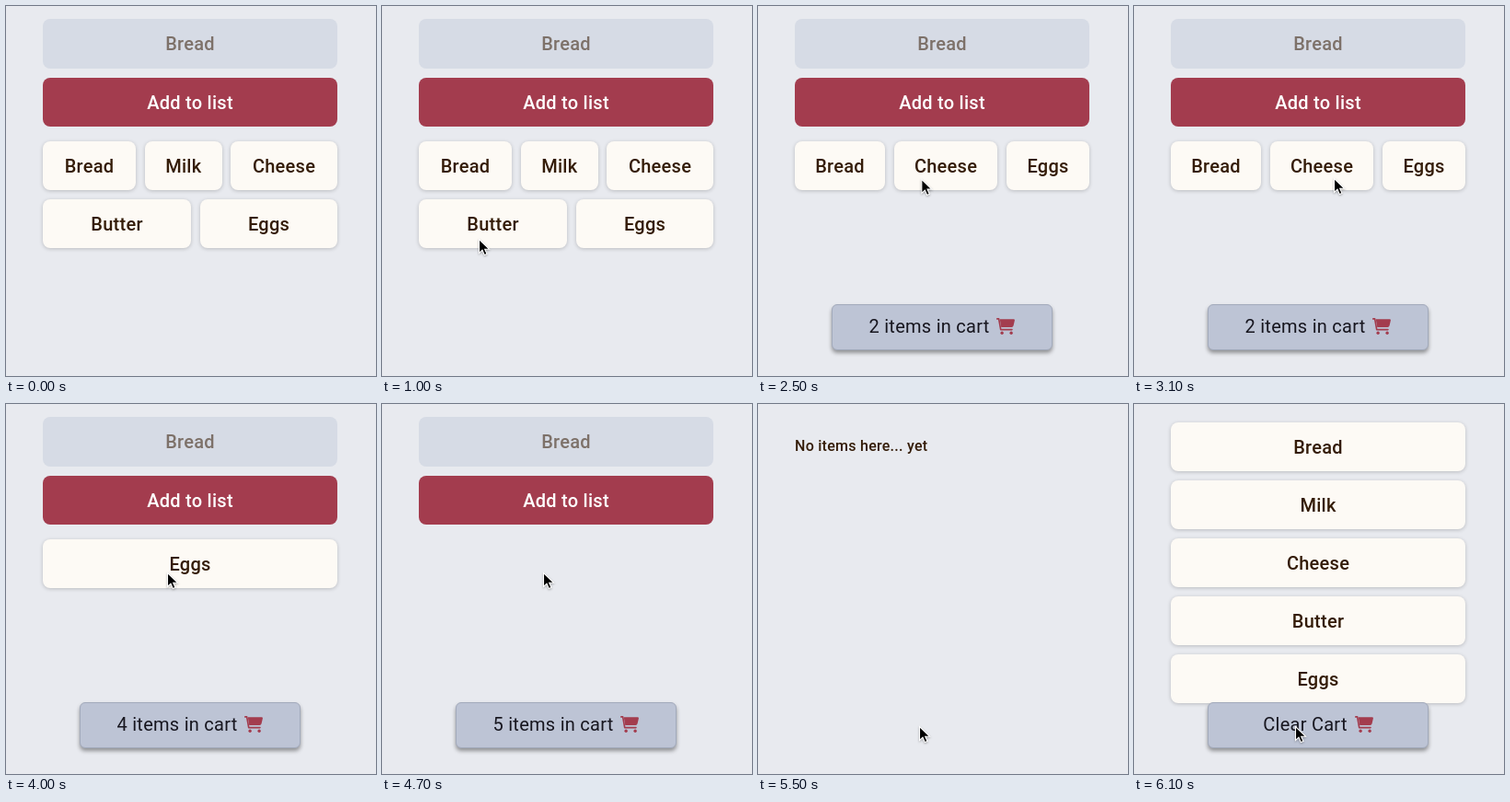
Animation of 402x402 px, one loop 8000 ms. Source, as an HTML page:

```html
<!DOCTYPE html>
<html lang="en">
<head>
<meta charset="utf-8">
<title>Shopping list</title>
<style>
  html, body { margin: 0; width: 100%; height: 100%; overflow: hidden; background: #e8eaef; }
  #stage { position: relative; width: 402px; height: 402px; overflow: hidden;
    font: 500 20px Roboto, Rubik, sans-serif; letter-spacing: .013em; color: #341c08; }
  .box { position: absolute; left: 40px; width: 320px; height: 53px; box-sizing: border-box;
    display: flex; align-items: center; justify-content: center; border-radius: 8px; white-space: nowrap; }
  .input { top: 14px; height: 54px; background: #d6dbe5; color: #7d7169; }
  .add { top: 78px; background: #a33c4e; color: #fff; }
  .card { background: #fdfaf5; box-shadow: 0 1px 4px rgba(0, 0, 0, .2); }
  .cart { left: 80px; top: 324px; width: 240px; height: 50px; gap: 8px; padding-bottom: 2px;
    background: #bdc4d5; border: 1px solid #a2aabb; border-radius: 6px; color: #17161f;
    font-weight: 400; box-shadow: 0 3px 4px rgba(0, 0, 0, .38); }
  .cart svg { width: 20px; height: 18px; }
  .empty { position: absolute; left: 40px; top: 36px; font-size: 16px; line-height: 19px; }
  #cursor { position: absolute; left: 0; top: 0; width: 16px; height: 22px; overflow: visible;
    filter: drop-shadow(0 1px 1px rgba(0, 0, 0, .3)); }
</style>
</head>
<body>
<div id="stage">
  <div id="view"></div>
  <svg id="cursor" viewBox="0 0 16 22">
    <path d="M.5 .5V15.5L4 12.2L6.3 17.6L9 16.4L6.7 11.2H11.5Z" fill="#000" stroke="#fff" stroke-width="1.1"/>
  </svg>
</div>
<script>
const LOOP = 8000, STEP = 100;
const view = document.getElementById('view');
const cursor = document.getElementById('cursor');

const cartIcon = `<svg viewBox="0 0 576 512" fill="#a33c4e">
  <path d="M108 36H540Q582 36 572 76L535 236Q524 288 476 288H152Z"/>
  <path d="M24 24H76L136 360H488" fill="none" stroke="#a33c4e" stroke-width="48" stroke-linecap="round" stroke-linejoin="round"/>
  <circle cx="176" cy="464" r="48"/><circle cx="464" cy="464" r="48"/></svg>`;

const card = (name, left = 40, right = 360, top = 147) =>
  `<div class="box card" style="left:${left}px;width:${right - left}px;top:${top}px">${name}</div>`;
const cart = label => `<div class="box cart"><span>${label}</span>${cartIcon}</div>`;
const count = n => cart(`${n} item${n > 1 ? 's' : ''} in cart`);
const form = '<div class="box input">Bread</div><div class="box add">Add to list</div>';
const firstRow = card('Bread', 40, 141) + card('Milk', 151, 234.5) + card('Cheese', 244, 360);
const allItems = ['Bread', 'Milk', 'Cheese', 'Butter', 'Eggs'];

// [start time, markup]
const screens = [
  [0, form + firstRow + card('Butter', 40, 201, 210) + card('Eggs', 211, 360, 210)],
  [1300, form + firstRow + card('Eggs', 40, 360, 210) + count(1)],
  [2300, form + card('Bread', 40, 138) + card('Cheese', 148, 260) + card('Eggs', 270, 360) + count(2)],
  [3300, form + card('Bread', 40, 199) + card('Eggs', 209, 360) + count(3)],
  [4000, form + card('Eggs') + count(4)],
  [4400, form + count(5)],
  [5500, '<div class="empty">No items here... yet</div>'],
  [5700, allItems.map((name, i) => card(name, 40, 360, 20 + 63 * i)).join('') + cart('Clear Cart')]
];

// [time, x, y] of the pointer tip
const path = [
  [100, 112, 367], [1000, 105, 253], [1100, 107, 250], [1400, 107, 250],
  [1900, 156, 198], [2100, 175, 188], [2400, 175, 188], [3100, 217, 187],
  [3300, 217, 187], [3700, 175, 183], [5000, 175, 183], [5400, 175, 350], [LOOP, 175, 350]
];

const ease = p => p * p * (3 - 2 * p);

function pointerAt(t) {
  const i = path.findIndex(key => key[0] > t);
  const [t0, x0, y0] = path[i - 1], [t1, x1, y1] = path[i];
  const p = ease((t - t0) / (t1 - t0));
  return [x0 + (x1 - x0) * p, y0 + (y1 - y0) * p];
}

let shown;
function render(now) {
  const t = Math.floor(now % LOOP / STEP) * STEP;
  const screen = screens.findLast(([start]) => start <= t);
  if (screen !== shown) view.innerHTML = (shown = screen)[1];
  const visible = t >= path[0][0];
  cursor.style.visibility = visible ? 'visible' : 'hidden';
  if (visible) {
    const [x, y] = pointerAt(t);
    cursor.style.transform = `translate(${x}px, ${y}px)`;
  }
}

const begin = performance.now();
function tick() {
  render(performance.now() - begin);
  requestAnimationFrame(tick);
}
tick();
</script>
</body>
</html>
```
